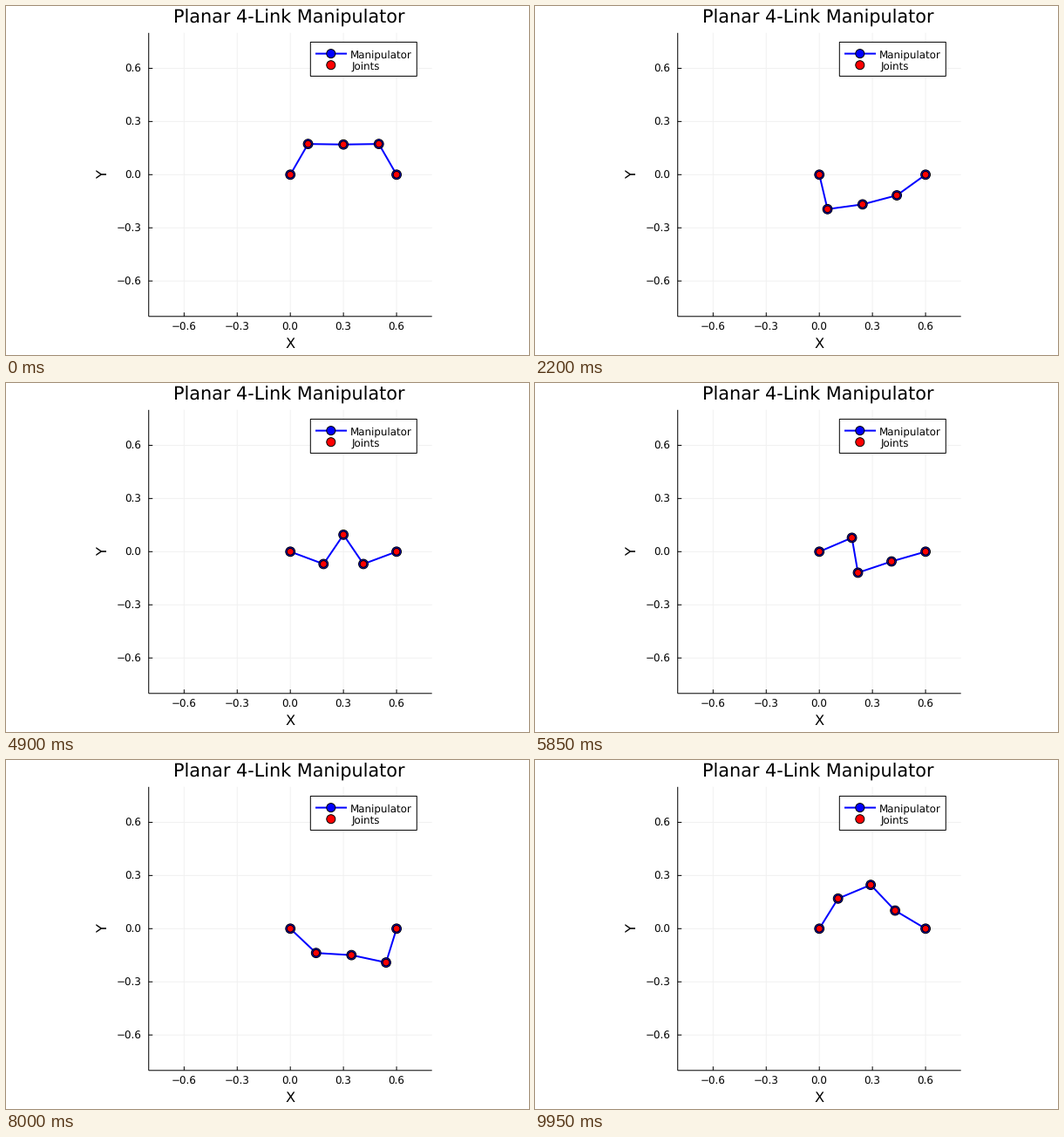
These frames come from a looping animation (600x400 px, 10000 ms). A matplotlib script:

```python
import numpy as np
import matplotlib.pyplot as plt
from matplotlib.animation import FuncAnimation
from matplotlib.patches import Circle, Rectangle

W, H, DPI = 600, 400, 100
FRAMES, INTERVAL = 200, 50
X0, Y0, UNIT = 326.2, 193.3, 203.1   # data origin and scale in pixels
SPAN = 0.8
LEFT, RIGHT = X0 - SPAN * UNIT, X0 + SPAN * UNIT
TOP, BOTTOM = Y0 - SPAN * UNIT, Y0 + SPAN * UNIT
LINK, REACH = 0.2, 3                 # link length; fixed end, in links
SPIN = np.pi                         # usual swing speed, rad/s
BLUE, RED, GRID = "#0000ff", "#ff0000", "#f1f1f1"

plt.rcParams.update({"font.family": "DejaVu Sans", "text.hinting": "none"})

# Poses of the closed chain: time, then how much it arches, zigzags and tilts
POSES = [
    (0.00, 0.85, 0.88, 0.00),
    (2.20, -0.84, -0.72, -0.39),
    (3.45, 0.02, 1.00, 0.71),
    (3.95, 1.22, 0.20, 0.30),
    (4.90, 0.48, -1.18, 0.00),
    (5.25, -1.29, -0.30, 0.10),
    (5.75, -0.40, 0.85, 0.85),
    (6.30, -1.30, 0.10, -0.10),
    (6.80, -0.33, 0.48, -1.08),
    (7.35, 1.17, 0.10, -0.40),
    (8.00, -0.75, -0.90, 0.27),
    (8.90, -0.50, 1.00, 0.50),
    (9.30, -1.29, 0.10, 0.10),
    (9.95, 1.24, 0.125, 0.34),
]
SHAPES = np.array([(1, 1, -1, -1), (1, -1, 1, -1), (1, -1, -1, 1)]) / 2


def unit(v):
    return v / np.linalg.norm(v)


def mode_at(t):
    """Swing along a great circle from pose to pose, with the turn nearest SPIN."""
    i = max(k for k in range(len(POSES) - 1) if POSES[k][0] <= t)
    (t0, *a), (t1, *b) = POSES[i:i + 2]
    a, b = unit(np.array(a)), unit(np.array(b))
    short = np.arccos(a @ b)
    turns = [short + 2 * np.pi * k for k in range(-2, 3)]
    angle = min(turns, key=lambda g: abs(abs(g) - SPIN * (t1 - t0)))
    angle *= (t - t0) / (t1 - t0)
    return a * np.cos(angle) + unit(b - (a @ b) * a) * np.sin(angle)


def joints_at(t):
    """Joint pixels; the sines are scaled until the chain ends at REACH."""
    sines = mode_at(t) @ SHAPES
    low, high = 0.0, 1 / np.abs(sines).max()
    for _ in range(40):
        mid = (low + high) / 2
        if np.sqrt(1 - (mid * sines) ** 2).sum() > REACH:
            low = mid
        else:
            high = mid
    sines = low * sines
    x = LINK * np.cumsum(np.r_[0, np.sqrt(1 - sines ** 2)])
    y = LINK * np.cumsum(np.r_[0, sines])
    return X0 + UNIT * x, Y0 - UNIT * y


fig = plt.figure(figsize=(W / DPI, H / DPI), dpi=DPI, facecolor="white")
ax = fig.add_axes([0, 0, 1, 1])
ax.set_xlim(0, W)
ax.set_ylim(H, 0)
ax.axis("off")


def pt(px):
    return px * 72 / DPI


def line(x, y, color="black", width=1.0, z=2):
    return ax.plot(x, y, color=color, lw=pt(width), zorder=z, snap=False,
                   solid_capstyle="butt", solid_joinstyle="round")[0]


def label(x, y, text, px, ha="center", va="baseline", **kw):
    ax.text(x, y, text, fontsize=pt(px), ha=ha, va=va, zorder=9, **kw)


def dot(x, y, r, color, z):
    return ax.add_patch(Circle((x, y), r, fc=color, ec="black", lw=pt(1), zorder=z))


# Grid, ticks and tick labels
for v in (-0.6, -0.3, 0.0, 0.3, 0.6):
    gx, gy = X0 + UNIT * v, Y0 - UNIT * v
    line([gx, gx], [TOP, BOTTOM], GRID, z=1)
    line([LEFT, RIGHT], [gy, gy], GRID, z=1)
    line([gx, gx], [BOTTOM - 4.5, BOTTOM])
    line([LEFT, LEFT + 4.5], [gy, gy])
    name = f"{v:.1f}".replace("-", "\u2212")
    label(gx - 0.2, 371.6, name, 11.9)
    label(155.3, gy + 4.4, name, 11.9, ha="right")
line([LEFT, LEFT], [TOP, BOTTOM])
line([LEFT, RIGHT], [BOTTOM, BOTTOM])

label(325, 19.3, "Planar 4-Link Manipulator", 20.8)
label(X0, 392.5, "X", 16.3)
label(111.3, Y0, "Y", 16.3, va="center", rotation=90)

# Legend
ax.add_patch(Rectangle((349.3, 41.4), 122, 39, fc="white", ec="black",
                       lw=pt(1), zorder=6, snap=False))
line([355, 391], [54.6, 54.6], BLUE, 2, z=7)
dot(372.8, 54.6, 5, BLUE, 8)
dot(372.8, 67.7, 5, RED, 8)
label(395.1, 59.3, "Manipulator", 11.9, ha="left")
label(397, 72.3, "Joints", 11.9, ha="left")

# The chain
px, py = joints_at(0)
arm = line(px, py, BLUE, 2, z=3)
rings = [dot(x, y, 5.4, BLUE, 4) for x, y in zip(px, py)]
cores = [dot(x, y, 3.8, RED, 5) for x, y in zip(px, py)]


def update(i):
    xs, ys = joints_at(i * INTERVAL / 1000)
    arm.set_data(xs, ys)
    for x, y, ring, core in zip(xs, ys, rings, cores):
        ring.center = core.center = (x, y)
    return [arm, *rings, *cores]


anim = FuncAnimation(fig, update, frames=FRAMES, interval=INTERVAL,
                     repeat=True, repeat_delay=0, blit=False)
plt.show()
```
